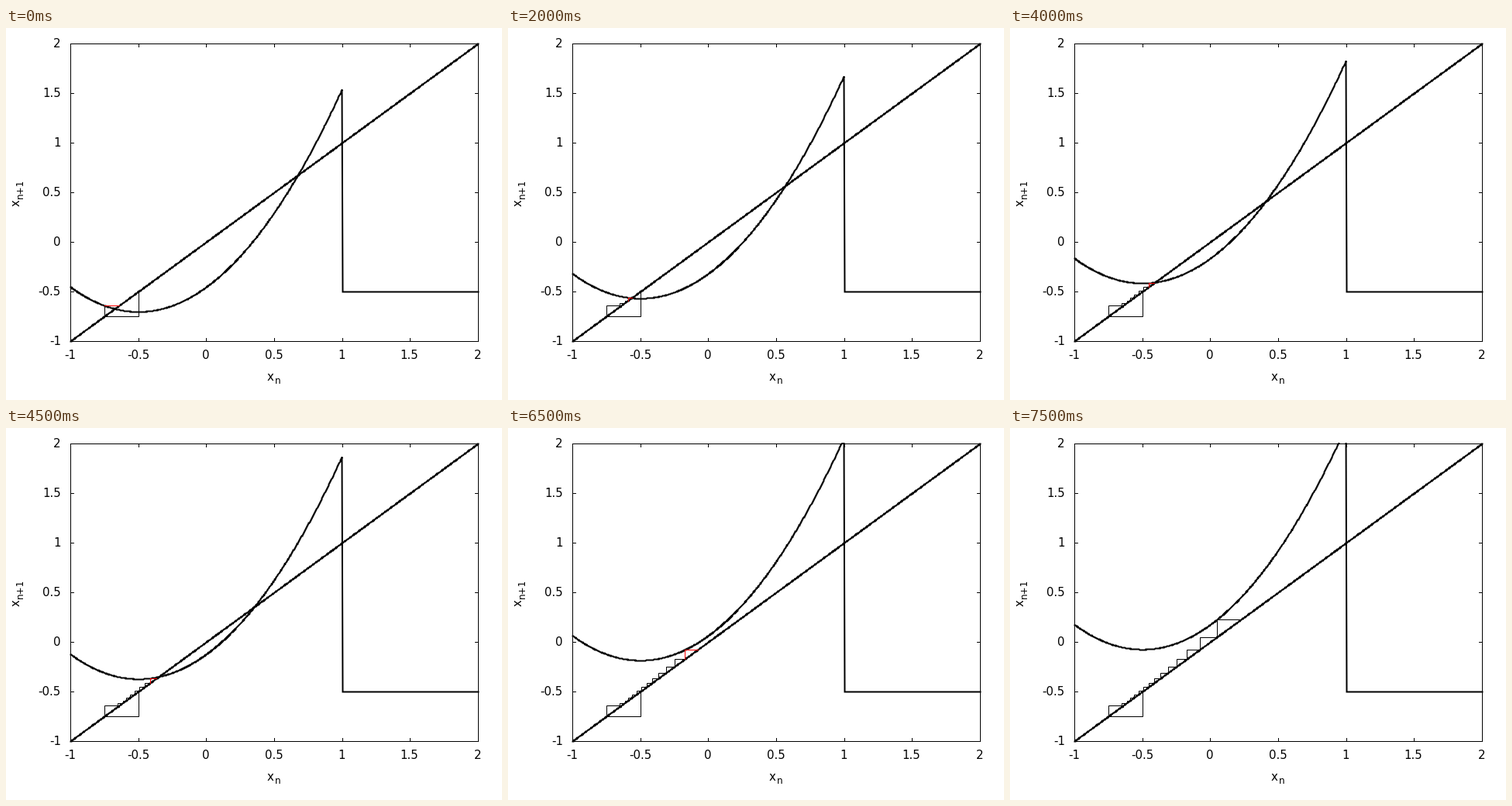
These frames come from a looping animation (640x480 px, 8 s). A matplotlib script:

```python
import numpy as np
import matplotlib.pyplot as plt
from matplotlib.animation import FuncAnimation
from matplotlib.patches import Rectangle

W, H, DPI = 640, 480, 100
FRAMES, INTERVAL = 16, 500
PX = 72 / DPI                      # one pixel in points
LEFT, RIGHT, TOP, BOTTOM = 83, 609, 20, 404
LO, HI = -1, 2

# Steps whose newest vertical / horizontal segment is already black
DARK_V, DARK_H = {0, 6, 11, 15}, {6, 15}

plt.rcParams["font.family"] = "DejaVu Sans"


def sx(x):
    return np.round(LEFT + (np.asarray(x) - LO) / (HI - LO) * (RIGHT - LEFT)) + 0.5


def sy(y):
    return np.round(BOTTOM - (np.asarray(y) - LO) / (HI - LO) * (BOTTOM - TOP)) + 0.5


def fast(x, c):
    return np.where(x < 1, x * x + x + c, -0.5)


def orbit(n):
    """Fast variable x and slowly drifting offset c."""
    xs, cs = [-0.748], [-0.453]
    for _ in range(n):
        x, c = xs[-1], cs[-1]
        xs.append(float(fast(x, c)))
        cs.append(c + 0.0602 + 0.04 * x)
    return [-0.5] + xs, cs


def cobweb(xs):
    """Staircase from the diagonal to the map and back."""
    px, py = [xs[0]], [xs[0]]
    for a, b in zip(xs, xs[1:]):
        px += [a, b]
        py += [b, b]
    return sx(px), sy(py)


fig = plt.figure(figsize=(W / DPI, H / DPI), dpi=DPI, facecolor="white")
ax = fig.add_axes([0, 0, 1, 1])
ax.set_xlim(0, W)
ax.set_ylim(H, 0)
ax.axis("off")


def line(px=(), py=(), width=1, color="black", z=2):
    art, = ax.plot(px, py, color=color, lw=width * PX, zorder=z, snap=False,
                   solid_capstyle="projecting", solid_joinstyle="miter")
    return art


def label(x, y, text, size=15, ha="center", rotation=0):
    ax.text(x, y, text, fontsize=size * PX, ha=ha, va="baseline",
            rotation=rotation, rotation_mode="anchor")


# Frame, ticks and labels
l, r, t, b = (v + 0.5 for v in (LEFT, RIGHT, TOP, BOTTOM))
line([l, r, r, l, l], [t, t, b, b, t])
for v in np.arange(LO, HI + 0.1, 0.5):
    x, y = sx(v), sy(v)
    line([x, x], [b, b - 4])
    line([x, x], [t, t + 4])
    line([l, l + 4], [y, y])
    line([r, r - 4], [y, y])
    label(x - 1, 427, f"{v:g}")
    label(71, y + 4.5, f"{v:g}", ha="right")

label(336.5, 455, "x", ha="left")
label(346.5, 459, "n", 12, "left")
label(18, 230.5, "x", ha="left", rotation=90)
label(22, 220, "n+1", 12, "left", 90)

# Moving parts
grid = np.linspace(LO, HI, 1000)
clip = Rectangle((LEFT - 2, TOP - 1), RIGHT - LEFT + 4, BOTTOM - TOP + 3,
                 transform=ax.transData)
diagonal = line(sx(grid), sy(grid), 2)
curve = line(width=2)
for art in (diagonal, curve):
    art.set_clip_path(clip)
trail = line(z=3)
rise = line(z=4)
run = line(z=4)

xs, cs = orbit(FRAMES)


def update(k):
    curve.set_data(sx(grid), sy(fast(grid, cs[k])))
    px, py = cobweb(xs[:k + 3])
    trail.set_data(px[:-2], py[:-2])
    rise.set_data(px[-3:-1], py[-3:-1])
    run.set_data(px[-2:], py[-2:])
    rise.set_color("black" if k in DARK_V else "red")
    run.set_color("black" if k in DARK_H else "red")
    return curve, trail, rise, run


anim = FuncAnimation(fig, update, frames=FRAMES, interval=INTERVAL,
                     repeat=True, repeat_delay=0, blit=False)
plt.show()
```
